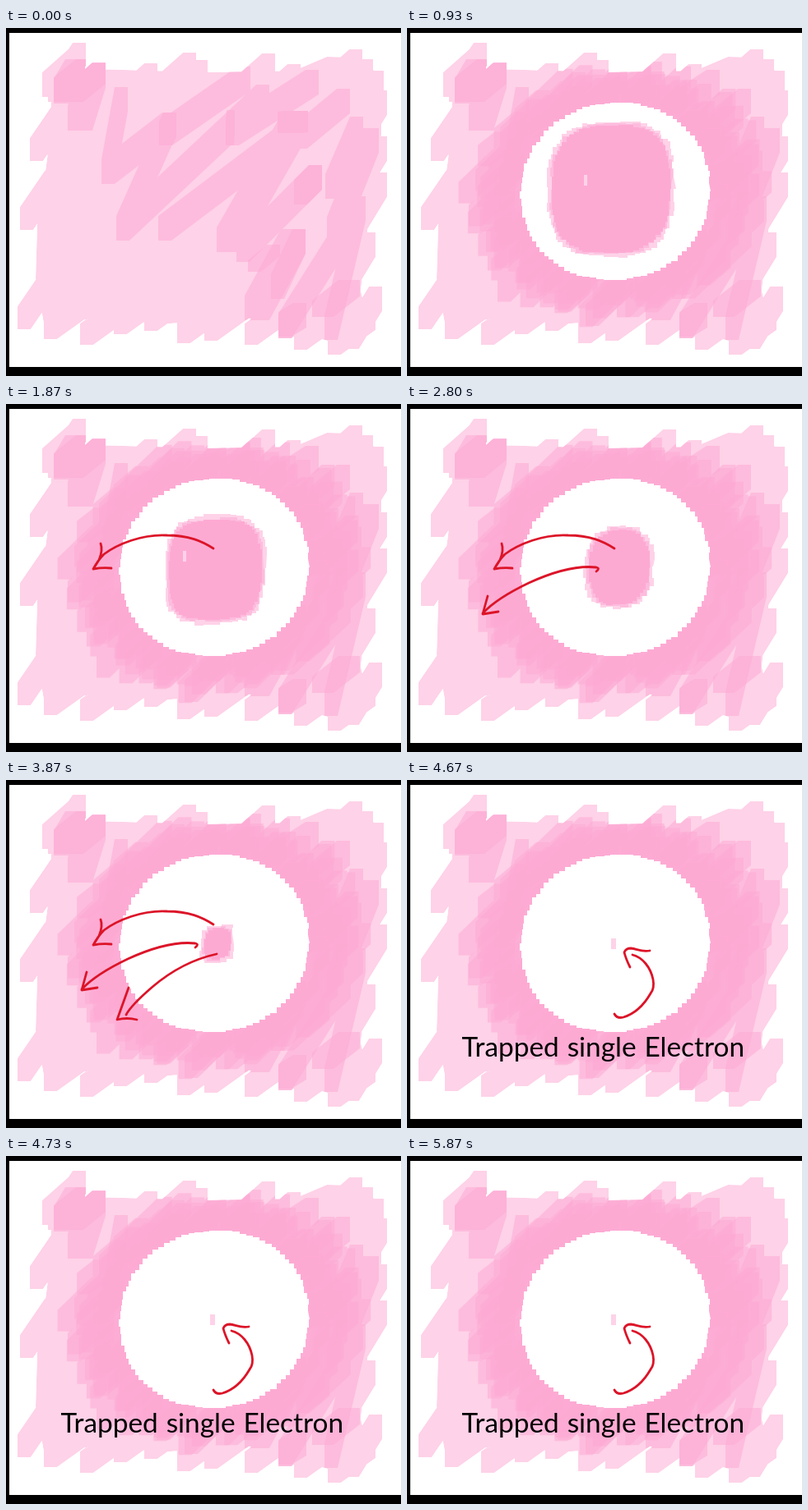
Animation of 480x424 px, one loop 7470 ms. Source, as an HTML page:

```html
<!DOCTYPE html>
<html lang="en">
<head>
<meta charset="utf-8">
<title>Trapped single Electron</title>
<style>
html, body { margin: 0; width: 100%; height: 100%; overflow: hidden; background: #fff; }
svg { display: block; width: 100vw; height: 100vh; }
.ink { fill: #fdaad3; fill-opacity: .53; }
.pen { fill: none; stroke: #dc1428; stroke-width: 2.8; stroke-linecap: round; stroke-linejoin: round; }
text { font: 33.4px Lato, "Open Sans", sans-serif; word-spacing: 1.3px; }
</style>
</head>
<body>
<svg id="stage" viewBox="0 0 480 424" preserveAspectRatio="none">
  <clipPath id="inside"><path id="edge"/></clipPath>
</svg>
<script>
const LOOP = 7470;
const STARTS = [0, 930, 1870, 2800, 3730, 4670];
const LAST = STARTS.length - 1;
const HOLE = { cx: 253, cy: 199, rx: 115, ry: 108, n: 2.1 };
const stage = document.getElementById("stage");
const parts = [];

let seed = 7;
const random = () => (seed = seed * 16807 % 2147483647) / 2147483647;
const jitter = size => (random() - .5) * 2 * size;

// Adds an element that is visible in the stages from..to
function add(tag, attrs, from = 0, to = LAST) {
  const el = document.createElementNS("http://www.w3.org/2000/svg", tag);
  for (const k in attrs) el.setAttribute(k, attrs[k]);
  stage.append(el);
  parts.push({ el, from, to });
  return el;
}
const ink = (d, from, to) => add("path", { d, class: "ink", "clip-path": "url(#inside)" }, from, to);
const pen = (d, from, to) => add("path", { d, class: "pen" }, from, to);
const fill = (d, color, from, to) => add("path", { d, fill: color }, from, to);

// Sweep of an upright w by h nib from its lower left to its upper right corner
function band([x1, y1, x2, y2, w = 16, h = 30]) {
  return `M${x1},${y1}V${y1 - h}L${x2 - w},${y2}H${x2}V${y2 + h}L${x1 + w},${y1}Z`;
}
const bands = list => list.map(s => band(s)).join("");

// Rounded blob whose edge is broken into square steps
function blob({ cx, cy, rx, ry, n }, grow = 0, rough = 1) {
  const count = Math.round((rx + ry) / 2.6);
  const bend = v => Math.sign(v) * Math.abs(v) ** (2 / n);
  let d = "";
  for (let i = 0; i < count; i++) {
    const a = i / count * 2 * Math.PI;
    const x = Math.round(cx + (rx + grow) * bend(Math.cos(a)) + jitter(rough));
    const y = Math.round(cy + (ry + grow) * bend(Math.sin(a)) + jitter(rough));
    d += d ? `H${x}V${y}` : `M${x},${y}`;
  }
  return d + "Z";
}

// Pale wash: a body with the tips of the scribble sticking out
const body = "M55,90L110,50 245,54 350,52 390,35 430,36 456,60 456,130 440,240 431,320 437,345 405,385 350,370 290,352 200,360 90,355 46,360 36,305 38,240 50,160Z";
const tipsLeft = [[51, 90], [29, 162], [17, 246], [14, 367]];
const tipsBelow = [[46, 379], [90, 386], [131, 373], [168, 369], [208, 384], [241, 381], [290, 386], [331, 378], [350, 392], [391, 398]];
const tipsAbove = [[96, 22], [121, 42], [184, 43], [231, 30], [245, 39], [327, 31], [358, 44], [433, 26], [446, 38], [459, 52]];
const tipsRight = [[463, 76], [463, 132], [463, 176], [449, 249], [457, 315]];
const wash = body + bands([
  ...tipsLeft.map(([x, y]) => [x, y, x + 46, y - 72, 16, 28]),
  ...tipsBelow.map(([x, y]) => [x, y, x + 58, y - 56, 16, 26]),
  ...tipsAbove.map(([x, y]) => [x - 52, y + 62, x, y, 16, 30]),
  ...tipsRight.map(([x, y]) => [x - 44, y + 76, x, y, 16, 30])
]);
document.getElementById("edge").setAttribute("d", wash);
ink(wash);

// Second pass of the marker
ink(bands([
  [58, 92, 104, 38, 32], [75, 125, 121, 43, 30], [116, 190, 148, 72], [116, 190, 206, 103],
  [134, 259, 206, 103], [134, 259, 320, 69], [185, 259, 348, 118], [186, 143, 297, 47],
  [267, 143, 380, 51], [256, 273, 367, 101, 30], [280, 285, 384, 167], [290, 356, 364, 245, 30],
  [350, 147, 418, 74], [388, 208, 434, 108], [390, 260, 453, 122, 20], [331, 378, 437, 205], [387, 380, 437, 205]
]));

// Spots where the marker crosses itself
ink(bands([
  [58, 90, 121, 38, 36], [186, 143, 207, 103], [267, 143, 278, 100, 10], [330, 128, 367, 101, 30, 26],
  [350, 215, 384, 167], [322, 330, 364, 245], [294, 297, 333, 264, 16, 14], [331, 376, 365, 335], [372, 352, 430, 307, 26, 20]
]));

// Dense strokes around the hole, closer to it with every pass
for (const spread of [56, 48, 36, 24, 14, 6]) {
  const count = 26;
  let d = "";
  for (let i = 0; i < count; i++) {
    const a = (i + random()) / count * 2 * Math.PI;
    const out = spread * (.5 + random() / 2);
    const x = HOLE.cx + (HOLE.rx + out) * Math.cos(a);
    const y = HOLE.cy + (HOLE.ry + out * .55) * Math.sin(a);
    const dx = 18 + 12 * random(), dy = dx * 1.15;
    d += band([x - dx, y + dy, x + dx, y - dy, 16, 26]);
  }
  ink(d, 1);
}
fill(blob(HOLE), "#fff", 1);

// Centre that loses its outer shell stage by stage
const cores = [
  { cx: 248, cy: 196, rx: 77, ry: 83, n: 2.8 },
  { cx: 254, cy: 202, rx: 61, ry: 66, n: 3.2 },
  { cx: 258, cy: 199, rx: 42, ry: 51, n: 2.4 },
  { cx: 257, cy: 199, rx: 21, ry: 24, n: 2.8 }
];
cores.forEach((core, i) => {
  const at = i + 1;
  ink(blob(core, 0, 2), at, at);
  ink(blob(core, -3, 2), at, at);
  fill(blob(core, -5), "#fdaad3", at, at);
});
fill("M215,179h4v13h-4z", "#fed2e8", 1, 2);
fill("M248,193h6v13h-6z", "#fed2e8", LAST);

// Arrows
pen("M252,176C238,167 222,160 196,160C166,158 135,171 119,183Q112,190 106,201M115,170Q118,178 113,190L106,201Q117,199 128,200", 2, 4);
pen("M230,204Q235,200 230,199C202,196 172,207 148,218C125,229 106,240 92,255M98,234L92,256L111,253", 3, 4);
pen("M256,212C224,219 198,235 178,252C163,265 151,276 146,286M149,253L135,292Q147,289 159,292", 4, 4);
pen("M252,285Q255,291 263,289C276,285 288,274 296,260Q301,254 299,243C296,228 286,216 274,213M295,208C285,210 280,206 272,205Q266,205 264,210Q266,218 271,228", LAST);

add("text", { x: 66.5, y: 337 }, LAST).textContent = "Trapped single Electron";

fill("M0,0H480V6H4V413H480V424H0Z", "#000");

let start = null, shown = -1;
function frame(now) {
  if (start === null) start = now;
  const t = Math.max(0, now - start) % LOOP;
  const at = STARTS.filter(s => s <= t).length - 1;
  if (at !== shown) {
    for (const p of parts) p.el.style.display = at >= p.from && at <= p.to ? "" : "none";
    shown = at;
  }
  requestAnimationFrame(frame);
}
frame(performance.now());
</script>
</body>
</html>
```
